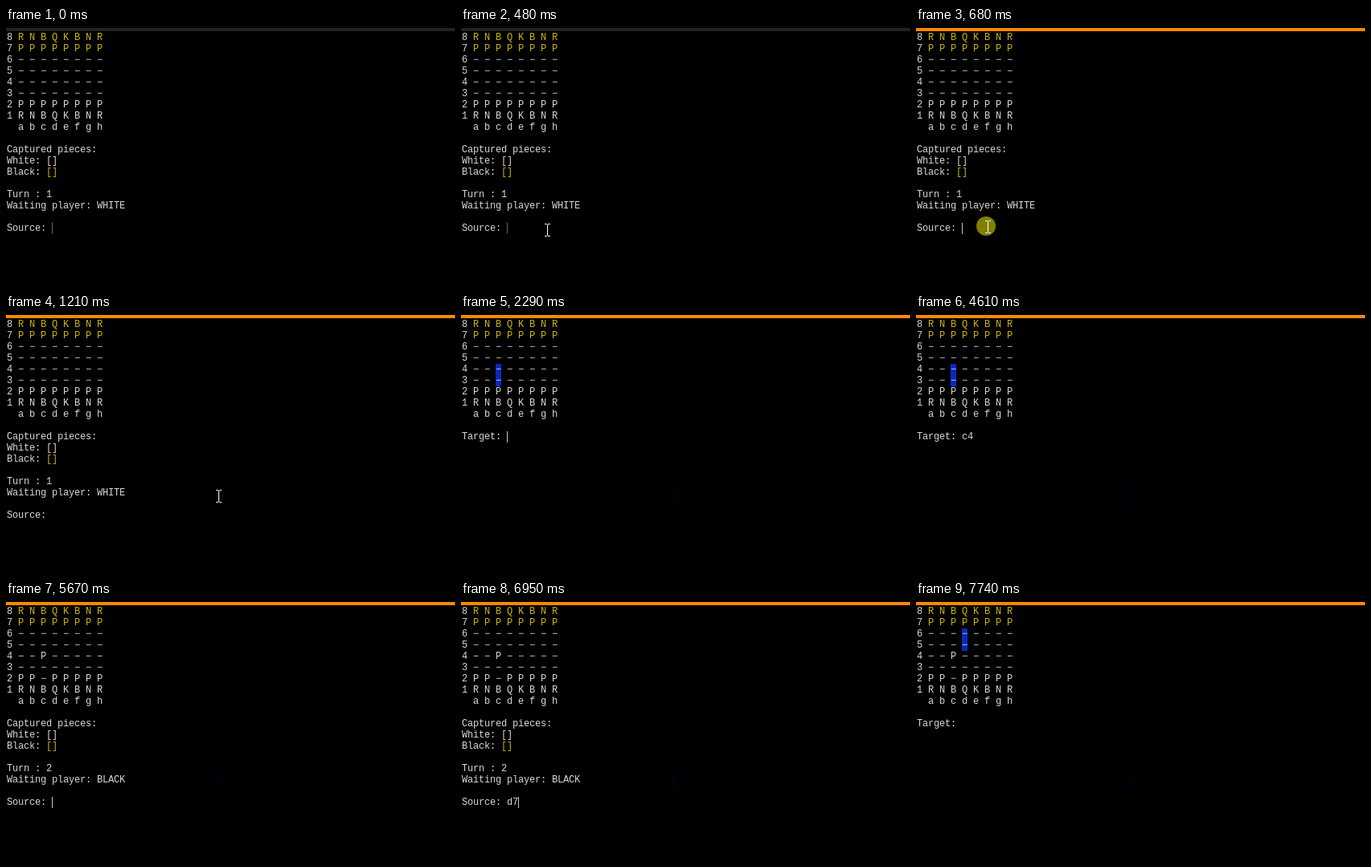
An HTML page with a canvas for the animation above (8000 ms loop, 558 by 323 pixels).

```html
<!DOCTYPE html>
<html lang="en">
<head>
<meta charset="utf-8">
<title>Console chess</title>
<style>
  html, body { margin: 0; width: 100%; height: 100%; overflow: hidden; background: #000; }
  canvas { display: block; }
</style>
</head>
<body>
<canvas id="stage" width="558" height="323"></canvas>
<script>
const ctx = document.getElementById('stage').getContext('2d');
const LOOP = 8000;
const CELL_W = 7, CELL_H = 14, LEFT = 1, TOP = 5;
const GREY = '#d8d8d8', YELLOW = '#ccb40c', CARET = '#c6c6c6', BLUE = '#0a28be';
const FOCUS_AT = 610, RELEASE_AT = 810, HIDE_MOUSE_AT = 1740;
const TICK = 67.5; // the pointer moves in steps of this many ms

const opening = ['RNBQKBNR', 'PPPPPPPP', '--------', '--------',
                 '--------', '--------', 'PPPPPPPP', 'RNBQKBNR'];
const afterC4 = opening.slice();
afterC4[4] = '--P-----';
afterC4[6] = 'PP-PPPPP';

const sourceOne = { board: opening, turn: 1, player: 'WHITE' };
const targetOne = { board: opening, moves: { col: 2, row: 4 } };
const sourceTwo = { board: afterC4, turn: 2, player: 'BLACK' };
const targetTwo = { board: afterC4, moves: { col: 3, row: 2 } };

// [start ms, screen, typed text, caret visible]
const timeline = [
  [0, sourceOne, '', true],
  [1210, sourceOne, '', false],
  [1740, sourceOne, 'c', true],
  [1940, sourceOne, 'c2', true],
  [2290, targetOne, '', true],
  [2820, targetOne, '', false],
  [3350, targetOne, '', true],
  [3550, targetOne, 'c', true],
  [4080, targetOne, 'c4', true],
  [4610, targetOne, 'c4', false],
  [4680, sourceTwo, '', true],
  [5140, sourceTwo, '', false],
  [5670, sourceTwo, '', true],
  [6220, sourceTwo, '', false],
  [6420, sourceTwo, 'd', true],
  [6950, sourceTwo, 'd7', true],
  [7210, targetTwo, '', true],
  [7740, targetTwo, '', false]
];

const cellX = col => LEFT + col * CELL_W;
const cellY = row => TOP + row * CELL_H;

function rect(color, x, y, w, h) {
  ctx.fillStyle = color;
  ctx.fillRect(x, y, w, h);
}

function print(text, col, row, color = GREY) {
  ctx.fillStyle = color;
  [...text].forEach((ch, i) => ctx.fillText(ch, cellX(col + i), cellY(row) + 10));
}

function drawBoard({ board, moves }) {
  if (moves) rect(BLUE, cellX(2 + moves.col * 2), cellY(moves.row), CELL_W, 2 * CELL_H);
  board.forEach((rank, row) => {
    const squares = [...rank].join(' ').replaceAll('-', '\u2212'); // wide dash
    print(String(8 - row), 0, row);
    print(squares, 2, row, row < 2 ? YELLOW : GREY);
  });
  print('a b c d e f g h', 2, 8);
}

function drawCaret(col, row, focused) {
  const x = cellX(col), y = cellY(row);
  if (focused) rect(CARET, x, y, 1, CELL_H);
  else for (let dy = 0; dy < CELL_H; dy += 2) rect(CARET, x, y + dy, 1, 1);
}

function drawPrompt(label, row, typed, caret, focused) {
  print(label + ': ' + typed, 0, row);
  if (caret) drawCaret(8 + typed.length, row, focused);
}

function drawStatus({ turn, player }) {
  print('Captured pieces:', 0, 10);
  print('White: []', 0, 11);
  print('Black:', 0, 12);
  print('[]', 7, 12, YELLOW);
  print('Turn : ' + turn, 0, 14);
  print('Waiting player: ' + player, 0, 15);
}

function glide(t, start, end, from, to, ease) {
  const p = ease(Math.min(1, Math.max(0, (t - start) / (end - start))));
  return from.map((v, i) => Math.round(v + (to[i] - v) * p));
}

const easeOut = p => 1 - (1 - p) ** 2;
const easeInOut = p => p * p * (3 - 2 * p);

function pointerAt(t) {
  const stepped = Math.floor(t / TICK) * TICK;
  return t < RELEASE_AT
    ? glide(stepped, 0, 600, [480, 332], [89, 248], easeOut)
    : glide(stepped, 740, 1140, [89, 248], [264, 226], easeInOut);
}

// Faint trace the pointer leaves behind once it is hidden
function drawTrace(x, y) {
  const color = '#000014';
  rect(color, x - 3, y - 9, 7, 3);
  rect(color, x - 1, y - 9, 3, 17);
  rect(color, x - 3, y + 5, 7, 3);
}

function drawPointer(t) {
  if (t < 70) return;
  const [x, y] = pointerAt(t);
  if (t >= HIDE_MOUSE_AT) return drawTrace(x, y);
  if (t >= FOCUS_AT && t < RELEASE_AT) {
    ctx.fillStyle = '#808000';
    ctx.beginPath();
    ctx.arc(x - 2, y - 1, 12, 0, 2 * Math.PI);
    ctx.fill();
  }
  for (const edge of [y - 8, y + 7]) {
    rect('#fff', x - 3, edge, 3, 1);
    rect('#fff', x + 1, edge, 3, 1);
  }
  rect('#fff', x, y - 7, 1, 14);
}

function draw(t) {
  const [, screen, typed, caret] = timeline.findLast(([start]) => start <= t);
  const focused = t >= FOCUS_AT;
  rect('#000', 0, 0, 558, 323);
  rect(focused ? '#ff8800' : '#222', 0, 0, 558, 4);
  ctx.font = '12px "Liberation Mono", monospace';
  drawBoard(screen);
  if (screen.turn) {
    drawStatus(screen);
    drawPrompt('Source', 17, typed, caret, focused);
  } else {
    drawPrompt('Target', 10, typed, caret, focused);
  }
  drawPointer(t);
}

const begin = performance.now();
function frame() {
  draw((performance.now() - begin) % LOOP);
  requestAnimationFrame(frame);
}
frame();
</script>
</body>
</html>
```
